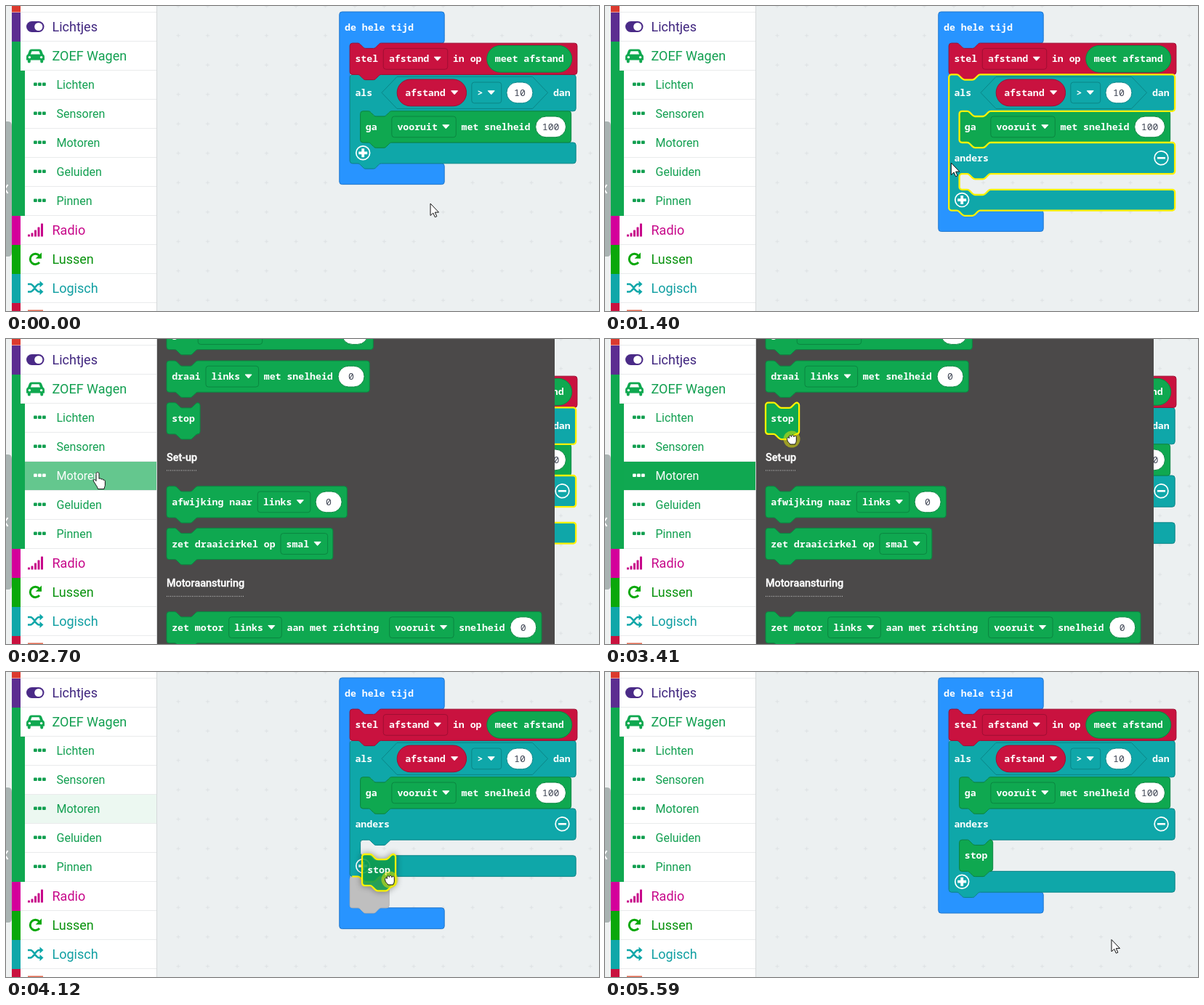
An HTML page for the animation above (6.16 s loop, 816 by 420 pixels).

```html
<!DOCTYPE html>
<html lang="nl">
<head>
<meta charset="utf-8">
<title>Blokken slepen</title>
<style>
html, body { margin: 0; width: 100%; height: 100%; overflow: hidden; background: #ecf0f1; }
svg { display: block; width: 816px; height: 420px; }
.code { font: bold 13.2px "Noto Sans Mono", "DejaVu Sans Mono", monospace; fill: #fff; white-space: pre; }
.num { font-weight: 500; fill: #3f4554; }
.cat { font: 18px Roboto, sans-serif; }
.sub { font: 16px Roboto, sans-serif; }
.head { font: 500 14.4px Roboto, sans-serif; fill: #fff; stroke: #fff; stroke-width: .35; }
.glow { fill: none; stroke: #fff200; stroke-width: 2.3; stroke-linejoin: round; }
#drag { filter: drop-shadow(0 0 4px rgba(0,0,0,.45)); }
</style>
</head>
<body>
<svg id="stage" viewBox="0 0 816 420">
  <defs>
    <pattern id="grid" x="217" y="20.5" width="40.5" height="40.5" patternUnits="userSpaceOnUse">
      <path d="M17.5 20.3h5M20 17.8v5" stroke="#dde1e3"/>
    </pattern>
  </defs>
  <rect width="816" height="420" fill="#ecf0f1"/>
  <rect x="208" width="608" height="420" fill="url(#grid)"/>
  <g id="work"></g>
  <g id="flyout"></g>
  <g id="side"></g>
  <g id="drag"></g>
  <circle id="press" r="11.5" fill="#e1e10a" fill-opacity=".55"/>
  <path id="cursor" fill="#fff" stroke="#111" stroke-width="1" stroke-linejoin="round"/>
</svg>
<script>
const $ = id => document.getElementById(id);
const LOOP = 6160, CH = 7.92, GAP = 7.2, H = 43.2, ARM = 14.4;
const GREEN = ['#0fa850', '#0b8540'], RED = ['#c9123f', '#9f0e32'],
      TEAL = ['#0fa7a9', '#0b8587'], BLUE = ['#2894ff', '#1f76cc'], GRAY = ['#bfbfbf', '#b5b5b5'];

// Block outlines
const DIP = 'c1.8 0 2.7.9 3.6 1.8l3.6 3.6c.9.9 1.8 1.8 3.6 1.8h10.8c1.8 0 2.7-.9 3.6-1.8l3.6-3.6c.9-.9 1.8-1.8 3.6-1.8';
const TAB = 'c-1.8 0-2.7.9-3.6 1.8l-3.6 3.6c-.9.9-1.8 1.8-3.6 1.8h-10.8c-1.8 0-2.7-.9-3.6-1.8l-3.6-3.6c-.9-.9-1.8-1.8-3.6-1.8';
const arc = (x, y, sweep = 1) => `a3.6 3.6 0 0 ${sweep} ${x} ${y}`;

function outline(x, y, w, h, mouths = [], linked = true) {
  const r = 3.6, right = x + w;
  let d = `M${x} ${y + r}${arc(r, -r)}` + (linked ? 'h7.2' + DIP : '') + `H${right - r}${arc(r, r)}`;
  for (const [top, end] of mouths) {
    const inner = x + ARM;
    d += `V${top - r}${arc(-r, r)}H${inner + 43.2}${TAB}H${inner + r}${arc(-r, r, 0)}` +
         `V${end - r}${arc(r, r, 0)}h7.2${DIP}H${right - r}${arc(r, r)}`;
  }
  return d + `V${y + h - r}${arc(-r, r)}` + (linked ? `H${x + 43.2}${TAB}` : '') + `H${x + r}${arc(-r, -r)}z`;
}

const path = (d, [fill, edge], more = '') => `<path d="${d}" fill="${fill}" stroke="${edge}" ${more}/>`;
const glow = d => `<path class="glow" d="${d}"/>`;
const text = (x, y, s, cls = 'code', more = '') =>
  `<text x="${x}" y="${y}" class="${cls}" ${more}>${s.replace('>', '&gt;')}</text>`;
const box = (x, y, w, h, rx, fill, edge) =>
  `<rect x="${x}" y="${y}" width="${w}" height="${h}" rx="${rx}" fill="${fill}" stroke="${edge}"/>`;
const arrowDown = (x, cy) =>
  `<path d="M${x} ${cy - 2.6}h9l-4.5 5z" fill="#fff" stroke="#fff" stroke-linejoin="round"/>`;

// Fields: [kind, text]; plain strings are labels, plain numbers are gaps
const drop = s => ['drop', s], num = s => ['num', s], variable = s => ['var', s], pill = s => ['pill', s];

function flow(x, cy, items, edge) {
  let out = '';
  for (const item of items) {
    if (typeof item === 'number') { x += item; continue; }
    const [kind, s] = Array.isArray(item) ? item : ['label', item];
    const len = s.length * CH, base = cy + 4.6;
    let w = len;
    if (kind === 'label') out += text(x, base, s);
    if (kind === 'drop') {
      w = len + 33;
      out += box(x, cy - 14.4, w, 28.8, 3.6, 'none', edge) + text(x + 7.6, base, s) + arrowDown(x + w - 18.5, cy);
    }
    if (kind === 'num') {
      w = Math.max(36, len + 18);
      out += box(x, cy - 14.4, w, 28.8, 14.4, '#fff', edge) + text(x + (w - len) / 2, base, s, 'code num');
    }
    if (kind === 'var') {
      w = len + 40;
      out += box(x, cy - 18.4, w, 36.8, 18.4, ...RED) + text(x + 11, base, s) + arrowDown(x + w - 21, cy);
    }
    if (kind === 'pill') {
      w = len + 22;
      out += box(x, cy - 18.4, w, 36.8, 18.4, ...GREEN) + text(x + 11, base, s);
    }
    x += w + GAP;
  }
  return { out, x };
}

function block(x, y, items, color = GREEN, lit = false, more = '') {
  const row = flow(x + GAP, y + H / 2, items, color[1]);
  const d = outline(x, y, row.x - x, H);
  return path(d, color, more) + row.out + (lit ? glow(d) : '');
}

const sign = (x, y, plus) =>
  `<g transform="translate(${x} ${y})" fill="none" stroke="#fff"><circle r="9.4" stroke-width="1.7"/>` +
  (plus ? '<path d="M-6 0H6M0-6V6" stroke-width="3.8"/>' : '<path d="M-5.5 0H5.5" stroke-width="2.6"/>') + '</g>';

// slot: none, empty, below (marker under the condition), inside (marker), filled
function workspace(slot, lit, stopLit) {
  const bx = 458.8, rx = bx + ARM, gx = rx + ARM, top = 94.4, ga = 144.8, mid = ga + H;
  const hasElse = slot !== 'none', full = slot === 'inside' || slot === 'filled';
  const elseTop = mid + H, elseEnd = elseTop + (full ? H : 21.6);
  const foot = hasElse ? elseEnd : mid, end = foot + 28.8;
  const blueEnd = end + (slot === 'below' ? H : 0);
  const mouths = [[ga, mid]];
  if (hasElse) mouths.push([elseTop, elseEnd]);
  const cond = outline(rx, top, 311, end - top, mouths);
  const cy = top + 25;
  let s = path(outline(bx, 8, 144.4, blueEnd + 28.8 - 8, [[51.2, blueEnd]], false), BLUE) +
    text(bx + GAP, 34.2, 'de hele tijd');
  if (slot === 'below') s += path(outline(rx, end, 54, H), GRAY);
  s += path(cond, TEAL);
  s += block(rx, 51.2, ['stel', drop('afstand'), 'in op', pill('meet afstand')], RED);
  s += `<path d="M517 ${cy}l21-22h186.5l21 22-21 22H538z" fill="none" stroke="${TEAL[1]}"/>`;
  s += flow(rx + GAP, cy, ['als', 26.8, variable('afstand'), drop('>'), num('10'), 20.8, 'dan'], TEAL[1]).out;
  s += block(gx, ga, ['ga', 13, drop('vooruit'), 'met snelheid', num('100')]);
  if (hasElse) s += text(rx + GAP, mid + 26, 'anders') + sign(765.5, mid + 21.3, false);
  s += sign(491.2, foot + 14.3, true);
  if (lit) s += glow(cond);
  if (slot === 'below') s += glow(`M${rx + 3} ${end}h7.8${DIP}`);
  if (slot === 'inside') s += path(outline(gx, elseTop, 54, H), GRAY) + glow(`M${gx + 3} ${elseTop}h7.8${DIP}`);
  if (slot === 'filled') s += block(gx, elseTop, ['stop'], GREEN, stopLit);
  return s;
}

function flyout(stopLit) {
  const x = 221;
  const heading = (y, s, w) => text(x, y, s, 'head') +
    `<path d="M${x} ${y + 13}h${w}" stroke="#ccc" stroke-dasharray="1 1.5"/>`;
  return '<rect x="207" width="548" height="420" fill="#4b4949"/>' +
    block(x, -28.6, ['ga', 13, drop('vooruit'), 'met snelheid', num('0')]) +
    block(x, 30, ['draai', drop('links'), 'met snelheid', num('0')]) +
    block(x, 87.7, ['stop'], GREEN, stopLit) +
    heading(168, 'Set-up', 41) +
    block(x, 202.8, ['afwijking naar', drop('links'), num('0')]) +
    block(x, 260.4, ['zet draaicirkel op', drop('smal')]) +
    heading(341.3, 'Motoraansturing', 107) +
    block(x, 375.6, ['zet motor', drop('links'), 'aan met richting', '', drop('vooruit'), 'snelheid', num('0')]);
}

function sidebar() {
  const strip = (y, h, c, w = 12) => `<rect x="8" y="${y}" width="${w}" height="${h}" fill="${c}"/>`;
  let s = '<rect width="208" height="420" fill="#fff"/><rect width="8" height="420" fill="#eef1f1"/>' +
    '<path d="M0 159h3q5 0 5 6v174q0 6-5 6H0z" fill="#a9b3b2"/>' +
    '<path d="M2.5 246l-4 6 4 6" fill="none" stroke="#fff" stroke-width="2"/>';
  s += '<rect id="tint" x="26" y="169" width="181" height="39.5" fill="#0fa850"/>';
  for (let y = 8.5; y < 420; y += 40) s += `<path d="M20 ${y}H207" stroke="#e9ebec"/>`;
  s += '<path d="M207.5 0V420" stroke="#d6d9da"/>';
  s += strip(0, 8.5, '#dc3a2e') + strip(9, 40, '#5c2d91') + strip(49, 240, '#0fa850') + strip(89, 200, '#0fa850', 18) +
    strip(289, 40, '#d4009b') + strip(329, 40, '#0aa80a') + strip(369, 40, '#0fa7a9') + strip(409, 11, '#c9123f');
  [['Lichtjes', '#40267f', 35], ['ZOEF Wagen', '#119f50', 75], ['Radio', '#c7088a', 315],
   ['Lussen', '#0a930f', 355], ['Logisch', '#119fa2', 395]]
    .forEach(([name, c, y]) => s += text(63.5, y, name, 'cat', `fill="${c}"`));
  ['Lichten', 'Sensoren', 'Motoren', 'Geluiden', 'Pinnen'].forEach((name, i) => {
    const y = 108 + 40 * i;
    s += `<g fill="#119f50" ${i === 2 ? 'id="pick"' : ''}>`;
    for (const x of [38, 44, 50]) s += `<rect x="${x}" y="${y - 2.6}" width="4.8" height="4.6" rx="1"/>`;
    s += text(69.5, y + 6, name, 'sub') + '</g>';
  });
  // Icons
  s += '<rect x="28" y="21" width="24.5" height="15" rx="7.5" fill="#4a2a87"/><circle cx="44.8" cy="28.5" r="5.6" fill="#fff"/>';
  s += '<path d="M35 59.5h11q2.4 0 3.2 2.2l1.8 4.8q2 1 2 3.2v4.8h-1.8v2q0 2-2 2t-2-2v-2H33.8v2q0 2-2 2t-2-2v-2H28v-4.8q0-2.2 2-3.2l1.8-4.8q.8-2.2 3.2-2.2z" fill="#0fa850"/>' +
    '<path d="M35.5 62.3h10l1.6 4.2H33.9z" fill="#fff"/><circle cx="32.4" cy="70.6" r="1.7" fill="#fff"/><circle cx="48.6" cy="70.6" r="1.7" fill="#fff"/>';
  [3, 5, 9, 13, 18].forEach((h, i) => s += `<rect x="${30 + i * 4.5}" y="${317.5 - h}" width="3" height="${h}" rx=".6" fill="#c7088a"/>`);
  s += '<path d="M45.6 343.4a7.2 7.2 0 1 0 .4 9.6" fill="none" stroke="#0aa80a" stroke-width="3"/><path d="M49 339.5v8.3h-8.3z" fill="#0aa80a"/>';
  s += '<path d="M30 383h3.5c5 0 7 10.500 12 10.500h2M30 393.500h3.500c5 0 7-10.500 12-10.500h2" fill="none" stroke="#0fa7a9" stroke-width="2.6"/>' +
    '<path d="M46.500 378.500l5 4.500-5 4.500zM46.500 389l5 4.500-5 4.500z" fill="#0fa7a9"/>';
  return s + '<rect x="30" y="418.500" width="21" height="2" fill="#e2694f"/>';
}

const CURSORS = {
  arrow: 'M0 0V16.5l3.8-3.500 2.500 5.700 2.500-1-2.500-5.600H11.500z',
  hand: 'M-2 2c0-2.600 4-2.600 4 0v7c1-1 2.900-.800 3 .800c1-1 2.700-.600 2.800 1c1-.800 2.600 0 2.600 1.800v5c0 2-1.300 3-1.400 5.500H.500c-.500-3-2.700-5-4.200-8-1.500-2.200-2.800-3.500-1.600-4.700 1.200-1 2.800.600 3.300 1.600z',
  grab: 'M-6.200 1c-1.300-3.400 1.800-4.400 2.600-2.400c-1-4.400 2.400-5 3-2c.200-3.200 3.500-3 3.500.200c.600-2.400 3.600-1.800 3.400 1v4.200c0 2.400-1.400 3-1.600 5h-7c-.600-2-3.900-3.200-3.900-6z'
};

// Tracks: [start, last step, step count, x, y, sag]
const POINTER = [
  [0, 1, 1, 584, 272, 0], [70, 620, 8, 492, 206, 0], [690, 690, 1, 490, 209, 0],
  [1330, 1400, 1, 490, 209, 0], [1400, 1940, 8, 130, 189, 53], [2020, 2090, 2, 126, 183.500, 0],
  [2780, 3240, 7, 257, 138, 0], [3560, 3740, 3, 345.500, 286, 0],
  [3820, 4120, 5, 528, 286, 0], [4200, 4350, 3, 542, 267, 0], [4730, 5190, 7, 697, 368.500, 0]
];
const BLOCK = [[0, 1, 1, 221, 88, 0], [3560, 3740, 3, 299, 237, 0], [3820, 4120, 5, 490, 251, 0], [4200, 4350, 3, 504, 233, 0]];
const ease = p => (1 - Math.cos(Math.PI * p)) / 2;

function place(track, t) {
  let [, , , x, y] = track[0];
  for (const [start, last, steps, tx, ty, sag] of track) {
    if (t < start) break;
    const done = Math.floor((t - start) / (last - start || 1) * (steps - 1) + .05) + 1;
    const raw = Math.min(1, done / steps);
    // the long leftward sweep is already under way at its first step
    const p = ease(raw);
    x += (tx - x) * p;
    y += (ty - y) * p + sag * 4 * p * (1 - p);
  }
  return [x, y];
}

// Last entry whose time has come
const current = (list, t) => list.reduce((v, [at, value]) => t >= at ? value : v, null);
const SHAPE = [[0, 'arrow'], [620, 'hand'], [1160, 'arrow'], [1940, 'hand'], [3010, 'arrow'], [3170, 'grab'], [4590, 'arrow']];
const SLOT = [[0, 'none'], [1160, 'empty'], [4050, 'below'], [4200, 'inside'], [4590, 'filled']];
const PRESSED = [[1090, 1160], [2400, 2550], [3320, 4590], [5510, 5590]];
const within = (t, a, b) => t >= a && t < b;

const shown = {};
function fill(id, key, make) {
  if (shown[id] === key) return;
  shown[id] = key;
  $(id).innerHTML = make();
}

function draw(t) {
  const slot = current(SLOT, t), lit = within(t, 1160, 3320), stopLit = t < 5510;
  fill('work', slot + lit + stopLit, () => workspace(slot, lit, stopLit));

  const open = within(t, 2480, 3560), picked = t >= 3320;
  fill('flyout', 'open' + picked, () => flyout(picked));
  $('flyout').style.display = open ? '' : 'none';

  const tint = t < 2500 || t > 4420 ? 0 : t < 3590 ? 1 - Math.exp((2500 - t) / 195) : Math.exp((3590 - t) / 210);
  $('tint').setAttribute('opacity', tint);
  $('pick').setAttribute('fill', open ? '#fff' : within(t, 1940, 2480) ? '#0d9047' : '#119f50');

  $('drag').style.display = within(t, 3560, 4590) ? '' : 'none';
  $('drag').setAttribute('transform', `translate(${place(BLOCK, t)})`);

  const spot = `translate(${place(POINTER, t)})`;
  $('cursor').setAttribute('d', CURSORS[current(SHAPE, t)]);
  $('cursor').setAttribute('transform', spot);
  $('press').setAttribute('transform', spot);
  $('press').style.display = PRESSED.some(([a, b]) => within(t, a, b)) ? '' : 'none';
}

$('side').innerHTML = sidebar();
$('drag').innerHTML = block(0, 0, ['stop'], GREEN, true, 'fill-opacity=".8"');
const began = performance.now();
function tick() {
  draw((performance.now() - began) % LOOP);
  requestAnimationFrame(tick);
}
tick();
</script>
</body>
</html>
```
